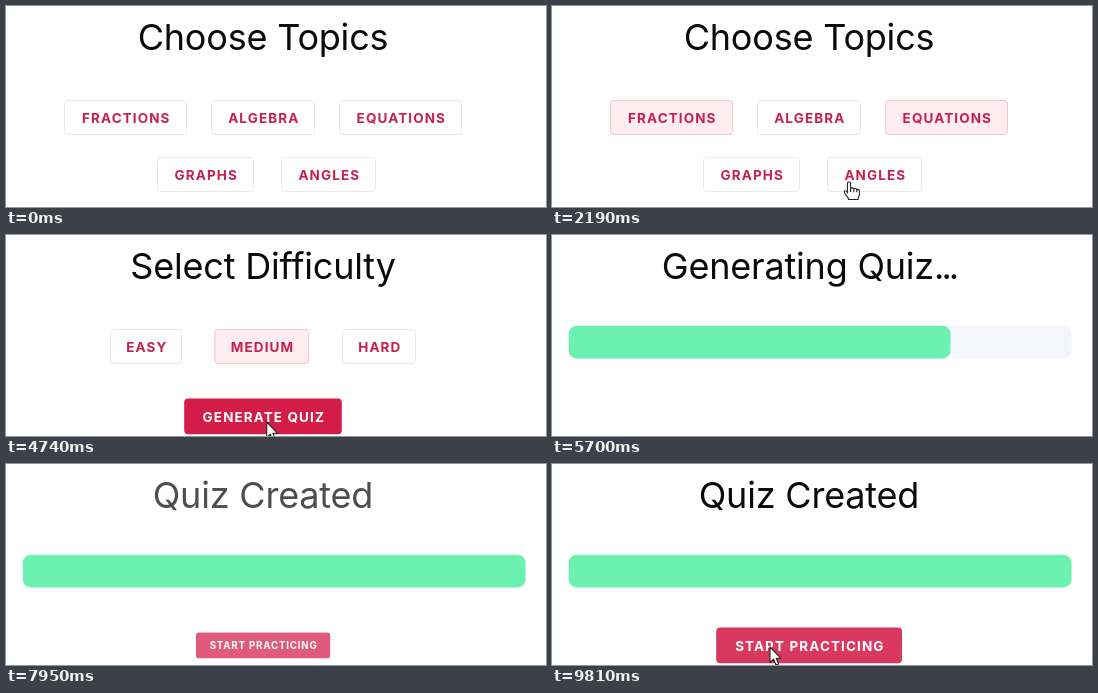
Animation of 540x201 px, one loop 9840 ms. Source, as an HTML page:

```html
<!DOCTYPE html>
<html lang="en">
<head>
<meta charset="utf-8">
<title>Quiz builder</title>
<style>
  html, body { margin: 0; width: 100%; height: 100%; overflow: hidden; background: #fff; }
  svg { display: block; width: 540px; height: 201px; }
  text { font-family: Inter, "Open Sans", sans-serif; text-anchor: middle; }
  .title { font-size: 36px; font-weight: 400; letter-spacing: -.2px; fill: #0a0a0a; }
  .dots { letter-spacing: -3px; }
  .label { font-size: 13.5px; font-weight: 700; letter-spacing: 1.1px; fill: #c6214e; }
  .chip { fill: #fff; stroke: #e9e9ec; }
  .tint { fill: #ffedf1; stroke: #f3c6d2; }
  .button rect { fill: #d41c48; }
  .button .label { fill: #fff; }
  #cursor path { fill: #fff; stroke: #222; stroke-width: 1.1; stroke-linejoin: round; }
  #hand .lines { fill: none; }
</style>
</head>
<body>
<svg id="stage" viewBox="0 0 540 201">
  <g id="topics"></g>
  <g id="levels"></g>
  <g id="bar">
    <rect x="16.8" y="90.7" width="502.7" height="32.7" rx="8" fill="#f4f6fc"/>
    <rect id="fill" x="16.8" y="90.7" height="32.7" rx="8" fill="#6cf1b0"/>
  </g>
  <g id="working"></g>
  <g id="done"></g>
  <g id="cursor">
    <path id="arrow" d="M0 0V15.5L3.6 12.2 6 18 8.6 16.9 6.2 11.3H11z"/>
    <g id="hand">
      <path d="M-1.6 11V1.6a1.6 1.6 0 0 1 3.2 0V7c.4-1.6 3-1.5 3.2.3.5-1.2 2.9-1 3 .6.6-1 2.6-.7 2.6 1v3.6c0 1.5-1.3 2.4-1.3 5H-.4c0-2.2-4-5.4-4.4-7.5-.3-1.6 1.8-1.9 3.2.4z"/>
      <path class="lines" d="M1.6 7v3M4.8 7.5v2.7M7.8 8v2.2"/>
    </g>
  </g>
</svg>
<script>
const LOOP = 9840, MID = 257;
const $ = id => document.getElementById(id);

function add(parent, tag, attrs, text) {
  const el = document.createElementNS('http://www.w3.org/2000/svg', tag);
  for (const k in attrs) el.setAttribute(k, attrs[k]);
  if (text) el.textContent = text;
  return parent.appendChild(el);
}

const title = (g, text) => add(g, 'text', { class: 'title', x: MID, y: 44 }, text);
const label = (g, text, x, y) => add(g, 'text', { class: 'label', x: x + .8, y }, text);

function chip(g, text, x, y, w) {
  const box = { x: x + .5, y: y + .5, width: w - 1, height: 34, rx: 3.5 };
  add(g, 'rect', { ...box, class: 'chip' });
  const tint = add(g, 'rect', { ...box, class: 'tint', opacity: 0 });
  label(g, text, x + w / 2, y + 23.3);
  return { tint, x, y, w };
}

function button(g, text, x, w) {
  const b = add(g, 'g', { class: 'button' });
  add(b, 'rect', { x, y: 163.6, width: w, height: 35.6, rx: 4 });
  label(b, text, x + w / 2, 187);
  return b;
}

title($('topics'), 'Choose Topics');
const topics = [
  ['FRACTIONS', 58, 94, 123], ['ALGEBRA', 205, 94, 104], ['EQUATIONS', 333, 94, 123],
  ['GRAPHS', 151, 151, 97], ['ANGLES', 275, 151, 95]
].map(c => chip($('topics'), ...c));

title($('levels'), 'Select Difficulty');
const levels = [['EASY', 104, 94, 72], ['MEDIUM', 208.5, 94, 94.5], ['HARD', 336, 94, 74]]
  .map(c => chip($('levels'), ...c));
button($('levels'), 'GENERATE QUIZ', 178.2, 157.6);

add(title($('working'), 'Generating Quiz'), 'tspan', { class: 'dots' }, '...');
title($('done'), 'Quiz Created');
const start = button($('done'), 'START PRACTICING', 164.2, 185.8);

const clamp = p => Math.min(1, Math.max(0, p));
const inOut = p => (1 - Math.cos(Math.PI * p)) / 2;
const outCubic = p => 1 - (1 - p) ** 3;
const outExpo = p => p >= 1 ? 1 : 1 - 2 ** (-9.2 * p);
const ramp = (t, a, b, ease = inOut) => ease(clamp((t - a) / (b - a)));
const fade = (id, v) => $(id).setAttribute('opacity', v);

// time, x, y of the pointer tip
const path = [
  [360, 190, 206], [720, 112, 111], [930, 112, 111], [1320, 388, 111],
  [1700, 388, 111], [2190, 297, 176], [3090, 297, 176], [3210, 229.5, 126],
  [3780, 229.5, 126], [4410, 260.7, 187], [9360, 236, 206], [9720, 218, 183]
];

// chip, start and end of its selection
const picks = [
  [topics[0], 760, 900], [topics[2], 1390, 1530], [topics[4], 2460, 2560],
  [levels[1], 3360, 3600]
];

function pointer(t) {
  let i = path.findIndex(k => k[0] > t);
  if (i < 0) i = path.length;
  const a = path[Math.max(0, i - 1)], b = path[i] || a;
  const p = a === b ? 0 : ramp(t, a[0], b[0]);
  return [a[1] + (b[1] - a[1]) * p, a[2] + (b[2] - a[2]) * p];
}

function drawCursor(t) {
  const late = t >= 9360;
  const [x, y] = pointer(late ? t : Math.min(t, 4410));
  const chips = t < 2650 ? topics : t < 5000 ? levels : [];
  const over = chips.some(c => x >= c.x && x <= c.x + c.w && y >= c.y && y <= c.y + 35);
  $('cursor').setAttribute('transform', `translate(${x} ${y})`);
  fade('cursor', t < 360 ? 0 : late ? 1 : 1 - ramp(t, 4770, 4950));
  fade('hand', +over);
  fade('arrow', +!over);
}

function draw(t) {
  fade('topics', 1 - ramp(t, 2520, 2680));
  fade('levels', ramp(t, 2660, 2850) - ramp(t, 4770, 4950));
  fade('bar', ramp(t, 4930, 5100));
  fade('working', ramp(t, 4930, 5100) - ramp(t, 6720, 7200));
  $('fill').setAttribute('width', 502.7 * ramp(t, 5100, 6690, outCubic));
  for (const [c, a, b] of picks) c.tint.setAttribute('opacity', ramp(t, a, b));

  const s = ramp(t, 7770, 8670, outExpo);
  fade('done', s);
  start.setAttribute('transform', `translate(${MID} 181.5) scale(${s}) translate(${-MID} -181.5)`);
  start.firstChild.setAttribute('fill-opacity', 1 - .13 * ramp(t, 9420, 9720));
  drawCursor(t);
}

function tick() {
  draw(performance.now() % LOOP);
  requestAnimationFrame(tick);
}
tick();
</script>
</body>
</html>
```
